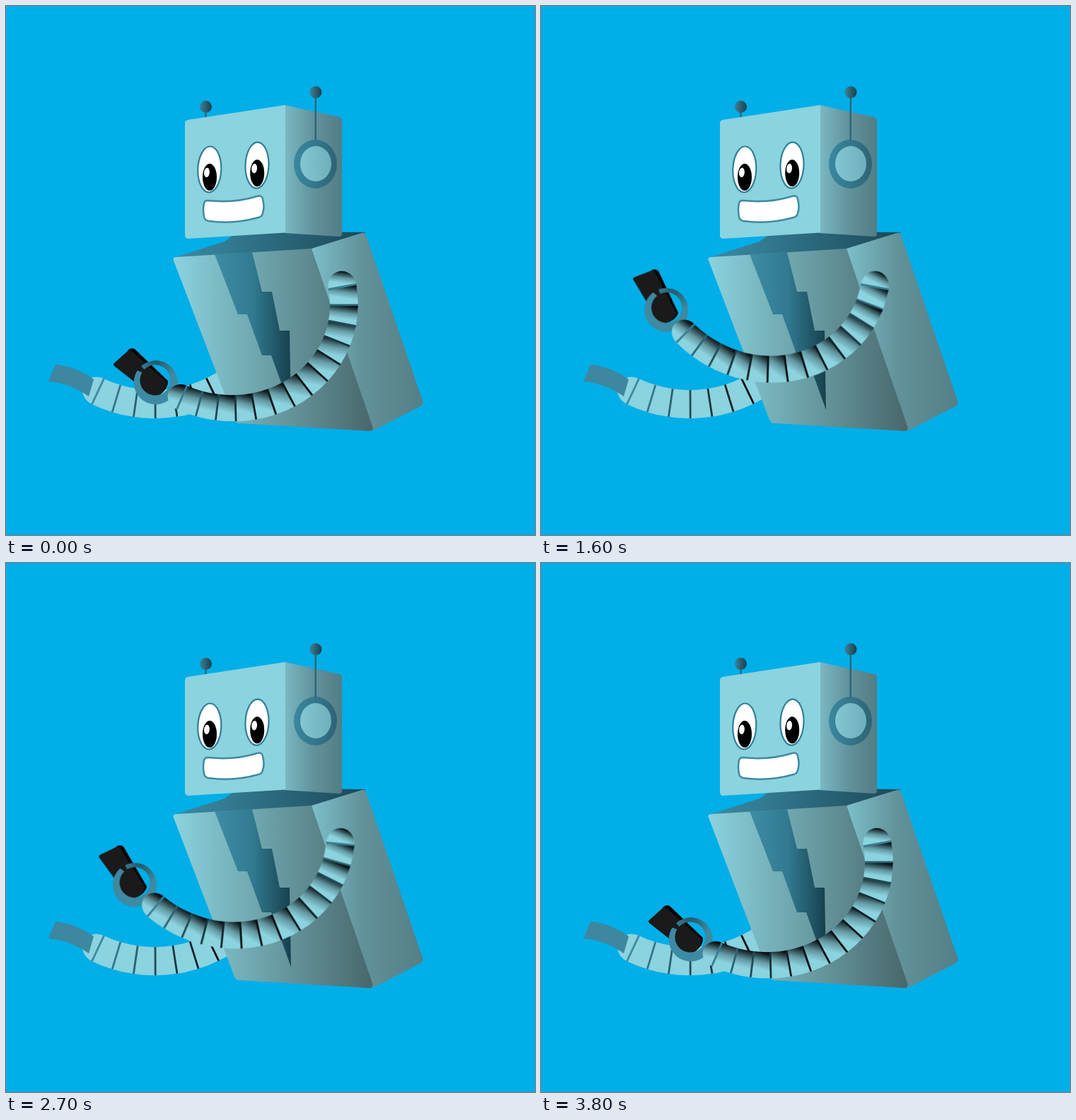
An HTML page that plays this animation: 748 px wide and 748 px high, repeating every 5000 ms.

```html
<!DOCTYPE html>
<html lang="en">
<head>
<meta charset="utf-8">
<title>Robot with phone</title>
<style>
  html, body { margin: 0; height: 100%; overflow: hidden; background: #00aee8; }
  svg { display: block; width: 100vw; height: 100vh; }
  #arm {
    transform-origin: 473.5px 387px;
    animation: lift 5s infinite;
  }
  @keyframes lift {
    0% { transform: rotate(0deg); animation-timing-function: steps(20, end); }
    40% { transform: rotate(26deg); animation-timing-function: steps(18, end); }
    76%, 100% { transform: rotate(0deg); }
  }
</style>
</head>
<body>
<svg viewBox="0 0 748 748">
  <defs>
    <linearGradient id="headSide">
      <stop offset="0" stop-color="#7ab9c4"/><stop offset=".5" stop-color="#62929b"/><stop offset="1" stop-color="#527d85"/>
    </linearGradient>
    <linearGradient id="front">
      <stop offset="0" stop-color="#8bd3de"/><stop offset="1" stop-color="#48676b"/>
    </linearGradient>
    <linearGradient id="side">
      <stop offset="0" stop-color="#7cbfca"/><stop offset=".45" stop-color="#62929a"/><stop offset="1" stop-color="#547f86"/>
    </linearGradient>
    <linearGradient id="top">
      <stop offset="0" stop-color="#3b8ba3"/><stop offset=".3" stop-color="#327990"/><stop offset="1" stop-color="#1c4856"/>
    </linearGradient>
    <linearGradient id="bolt">
      <stop offset="0" stop-color="#3d8da5"/><stop offset=".5" stop-color="#317a91"/><stop offset="1" stop-color="#17404c"/>
    </linearGradient>
    <linearGradient id="ear">
      <stop offset="0" stop-color="#3a88a0"/><stop offset="1" stop-color="#2d6475"/>
    </linearGradient>
    <linearGradient id="earIn">
      <stop offset="0" stop-color="#82c7d2"/><stop offset="1" stop-color="#70afba"/>
    </linearGradient>
    <linearGradient id="ball">
      <stop offset="0" stop-color="#3d8297"/><stop offset="1" stop-color="#1a3f4b"/>
    </linearGradient>
    <linearGradient id="shade" x1=".6" x2=".4" y2="1">
      <stop offset="0" stop-color="#000"/><stop offset=".14" stop-color="#22383d"/>
      <stop offset=".38" stop-color="#6399a3"/><stop offset=".65" stop-color="#8bd3de"/>
    </linearGradient>
    <radialGradient id="claw" gradientUnits="userSpaceOnUse" cx="212" cy="500" r="32">
      <stop offset="0" stop-color="#235565"/><stop offset="1" stop-color="#3d8aa3"/>
    </radialGradient>
  </defs>

  <rect width="748" height="748" fill="#00aee8"/>

  <g id="rear"></g>
  <path fill="#3d87a0" d="M70 507Q100 510 124 528L117 552Q90 533 60 531Z"/>

  <g id="body">
    <path fill="url(#top)" d="M237 356L309 333L330 318L504 320Q508 319 508 322L433 344Z"/>
    <path fill="url(#side)" d="M432 343L503 321Q507 319 509 324L589 558Q591 563 586 566L522 599Q518 601 516 600Z"/>
    <path fill="url(#front)" d="M240 355L432 343L518 594Q520 601 514 601L330 590Q325 590 323 585L237 360Q235 356 240 355Z"/>
    <path fill="url(#bolt)" d="M295 351L348 348L362 404H376L387 459H401L403 571L375 494H362L341 436H328Z"/>
  </g>

  <g id="head">
    <path stroke="#27687b" stroke-width="2.4" d="M282.5 148V160"/>
    <circle cx="282.5" cy="142.5" r="8.5" fill="url(#ball)"/>
    <path fill="url(#headSide)" d="M394 140L471 157Q475 158 475 162V322Q475 326 471 326L394 321Z"/>
    <path fill="#8bd3de" d="M257 161L395 140V320.5L258 329Q253 329 253 324V166Q253 162 257 161Z"/>
    <ellipse cx="437.5" cy="223.5" rx="30.5" ry="34.5" fill="url(#ear)"/>
    <ellipse cx="438" cy="223" rx="22" ry="25" fill="url(#earIn)"/>
    <path stroke="#27687b" stroke-width="2.4" d="M437.8 127V190"/>
    <circle cx="438" cy="122" r="8.5" fill="url(#ball)"/>
    <g id="eye">
      <ellipse cx="287.8" cy="231" rx="16.5" ry="32.5" fill="#fff" stroke="#2f7f99" stroke-width="2.2" transform="rotate(2 288 231)"/>
      <ellipse cx="288" cy="242" rx="10" ry="19"/>
      <ellipse cx="284" cy="235.5" rx="3.9" ry="6.7" fill="#fff" transform="rotate(5 284 235)"/>
    </g>
    <use href="#eye" x="67.2" y="-5.8"/>
    <path fill="#fff" stroke="#3d8aa3" stroke-width="2.5" d="M285 275Q324 279 355 269Q362 267 363 273Q366 285 363 293Q362 298 357 299Q322 309 286 304Q281 303 280 298Q278 288 280 279Q281 275 285 275Z"/>
  </g>

  <g id="arm">
    <path d="M172 487Q177 482 182 485L229 530Q230 541 216 551L200 540Z"/>
    <path fill="#1a1a1a" d="M153 505L173 487Q175 485 177 487L226 531Q228 541 216 551L200 553L186 535L153 509Q151 507 153 505Z"/>
    <path fill="url(#claw)" d="M191.1 509.2A31 31 0 1 1 185.7 515.5L192.5 518A21.5 21.5 0 1 0 195.5 514.1Z"/>
    <g id="tube"></g>
  </g>
</svg>
<script>
  const NS = 'http://www.w3.org/2000/svg';
  const rad = deg => deg * Math.PI / 180;
  const tone = k => `rgb(${[61, 139, 163].map(c => Math.round(c * (1 - k)))})`;

  // Draws a ribbed tube by walking from a point with a turning heading.
  function drawTube({ parent, x, y, step, ribs, heading, half, bend, fill, dark }) {
    const group = document.getElementById(parent);
    const add = attrs => {
      const el = document.createElementNS(NS, 'path');
      for (const k in attrs) el.setAttribute(k, attrs[k]);
      group.append(el);
    };
    const joints = [];
    for (let i = 0; i < ribs; i++) {
      const h = heading(i - .5), a = rad(h), w = half(i);
      const edge = s => `${x - Math.sin(a) * w * s} ${y + Math.cos(a) * w * s}`;
      joints.push({ h, w, left: edge(1), right: edge(-1) });
      x += step * Math.cos(rad(heading(i)));
      y += step * Math.sin(rad(heading(i)));
    }
    const cap = (j, from, to) =>
      add({ d: `M${from}A${j.w} ${j.w * 1.12} ${j.h + 90} 0 1 ${to}Z`, fill });

    const first = joints[0], last = joints[ribs - 1];
    cap(first, first.left, first.right);
    cap(last, last.right, last.left);
    joints.slice(1).forEach((b, i) => {
      const a = joints[i];
      add({ d: `M${a.left}A150 150 0 0 ${bend} ${b.left}L${b.right}A150 150 0 0 ${1 - bend} ${a.right}Z`, fill });
    });
    joints.forEach((j, i) =>
      add({ d: `M${j.left}L${j.right}`, stroke: tone(dark(i)), 'stroke-width': 2.8 }));
  }

  drawTube({
    parent: 'rear', x: 130, y: 545, step: 27.9, ribs: 8, bend: 0, fill: '#8bd3de',
    heading: i => 21 - 8.5 * i,
    half: () => 20,
    dark: i => Math.min(1, i / 6) * .9
  });
  drawTube({
    parent: 'tube', x: 475.5, y: 397, step: 26, ribs: 14, bend: 1, fill: 'url(#shade)',
    heading: i => 84.7 + 9.57 * i + 5 * Math.sin(Math.PI * i / 12),
    half: i => 20 - i / 7,
    dark: i => .1 + .8 * Math.sin(Math.PI * i / 13)
  });
</script>
</body>
</html>
```
